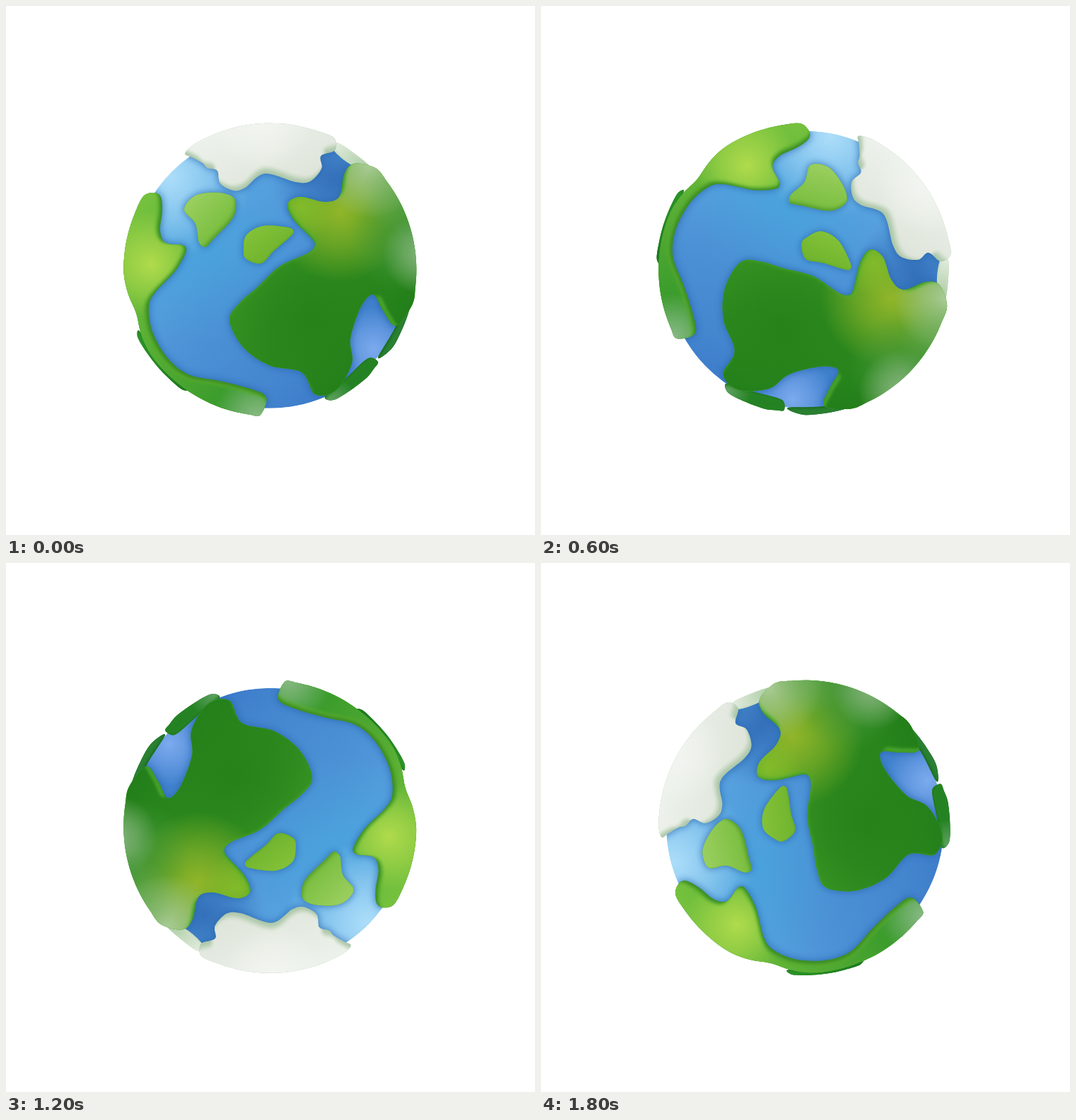
Recreate the animation shown at these times as an HTML page. Size 748 by 748 pixels, loop 2 s.

```html
<!DOCTYPE html>
<html lang="en">
<head>
<meta charset="utf-8">
<title>Spinning globe</title>
<style>
  html, body { margin: 0; width: 100%; height: 100%; overflow: hidden; background: #fff; }
  svg { display: block; width: 100vw; height: 100vh; }
</style>
</head>
<body>
<svg id="stage" viewBox="0 0 748 748"></svg>
<script>
const CX = 373.3, CY = 372.8, R = 196;
const STEP = 200;
const ANGLES = [0, 24, 41, 58, 88, 128, 182, 211.5, 272, 302];

// Blob: [x, y, radius, colour, opacity]
const ocean = [
  [285, 350, 130, '#43a5dc', .6],
  [232, 242, 115, '#b0e0fa', .95],
  [462, 245, 85, '#2f69b4', .85],
  [345, 480, 130, '#4a8cd0', .5],
  [520, 485, 60, '#7fadf0', .95]
];

// Coasts are key points; a rim [from, to, radius] closes the land along the horizon.
// lift is how far the top face stands off, as a share of the distance to the centre.
const lands = [
  { coast: '515,236 484,222 462,202', rim: [-62, -46, 203],
    wall: '#b9d3b4', lip: '#d5e2d1', face: ['#e3ece0', '#a9cba0'], lift: .01 },
  { coast: '262,540 212,490 188,459', rim: [153, 126, 210],
    wall: '#17701a', lip: '#2a8f26', face: ['#2c9427', '#1c7a1e'], lift: .01 },
  { coast: '526,497 551,453 572,398', rim: [9, 33, 205],
    wall: '#17661c', lip: '#1b7021', face: ['#1b7021', '#33883c'], lift: .01 },
  { coast: '451,552 480,527 512,498 526,503 520,513', rim: [48, 64, 205],
    wall: '#1d741d', lip: '#2a8826', face: ['#237f20', '#268426'], lift: .02,
    blobs: [[455, 560, 40, '#7fb383', .7]] },
  { coast: '209,264 219,270 221,290 218,318 226,335 250,338 255,346 240,374 211,405 202,425 207,460 228,497 258,521 302,530 345,541 368,553 360,578',
    rim: [98, 210, 207], dip: [162, 8],
    wall: '#3c8c24', lip: '#55aa2d', face: ['#78c33f', '#35982a'], lift: .04,
    blobs: [[205, 365, 75, '#b0db4c', 1], [355, 582, 62, '#a5c5a4', .75]] },
  { coast: '551,452 533,431 519,408 502,425 487,470 489,505 467,543 437,549 418,518 372,508 335,482 316,444 331,419 356,397 387,368 429,348 436,334 407,303 398,280 416,270 450,277 471,270 478,238 492,223',
    rim: [-44, 14, 207],
    wall: '#3a9124', lip: '#55b232', face: ['#43a028', '#1f7b18'], lift: .05,
    blobs: [[430, 445, 125, '#27821a', 1], [472, 290, 100, '#9cba2b', .9], [415, 285, 48, '#8fc52c', .7],
      [562, 330, 75, '#4c9b3e', .7], [590, 350, 58, '#9abe92', .8], [515, 222, 78, '#b8d2a8', .9], [555, 265, 55, '#72b062', .55]] },
  { coast: '252,288 268,268 300,264 322,271 325,288 318,304 293,330 282,341 273,334 268,308',
    wall: '#569f2e', lip: '#6eb339', face: ['#9fd163', '#6fb936'], lift: .06 },
  { coast: '336,346 340,324 364,311 402,314 406,322 378,347 361,364 340,358',
    wall: '#579f26', lip: '#6fb32e', face: ['#86c43a', '#6aaf2a'], lift: .08 },
  { coast: '465,204 445,212 446,230 430,248 410,249 366,237 338,257 322,261 303,251 299,233 285,229 278,222 263,214 253,209',
    rim: [238, 296, 207],
    wall: '#adc7aa', lip: '#c6d8c2', face: ['#eff5ef', '#dde3d8'], lift: .07,
    blobs: [[362, 162, 70, '#f3f5f1', .9]] }
];

const rad = a => a * Math.PI / 180;

function rimPoints([from, to, r], [mid, depth] = [0, 0]) {
  const n = Math.ceil(Math.abs(to - from) / 8);
  return Array.from({ length: n + 1 }, (_, i) => {
    const a = from + (to - from) * i / n;
    const d = r - depth * Math.exp(-(((a - mid) / 9) ** 2));
    return [CX + d * Math.cos(rad(a)), CY + d * Math.sin(rad(a))];
  });
}

// Closed smooth curve through the points
function curve(p) {
  const n = p.length, at = i => p[(i + n) % n];
  const span = (a, b) => Math.hypot(a[0] - b[0], a[1] - b[1]);
  // Handles never outgrow the segment they bend
  const handle = (b, before, after, len, sign) => {
    const k = sign * Math.min(1 / 6, .4 * len / (span(before, after) || 1));
    return [0, 1].map(j => (b[j] + (after[j] - before[j]) * k).toFixed(1));
  };
  let d = `M${p[0]}`;
  for (let i = 0; i < n; i++) {
    const [a, b, c, e] = [at(i - 1), at(i), at(i + 1), at(i + 2)];
    const len = span(b, c);
    d += `C${handle(b, a, c, len, 1)} ${handle(c, b, e, len, -1)} ${c}`;
  }
  return d + 'Z';
}

function outline({ coast, rim, dip }) {
  const p = coast.split(' ').map(s => s.split(',').map(Number));
  return curve(rim ? p.concat(rimPoints(rim, dip)) : p);
}

let defs = '', count = 0;

function blob([x, y, r, color, o]) {
  const id = 'b' + count++;
  defs += `<radialGradient id="${id}">
    <stop stop-color="${color}" stop-opacity="${o}"/>
    <stop offset=".5" stop-color="${color}" stop-opacity="${o * .55}"/>
    <stop offset="1" stop-color="${color}" stop-opacity="0"/></radialGradient>`;
  return `<circle cx="${x}" cy="${y}" r="${r}" fill="url(#${id})"/>`;
}

function ramp(id, [a, b]) {
  defs += `<linearGradient id="${id}" x1=".05" y1=".05" x2=".85" y2=".9">
    <stop stop-color="${a}"/><stop offset="1" stop-color="${b}"/></linearGradient>`;
}

function blur(id, s) {
  defs += `<filter id="${id}" x="-30%" y="-30%" width="160%" height="160%" color-interpolation-filters="sRGB">
    <feGaussianBlur stdDeviation="${s}"/></filter>`;
}

const raise = k => `translate(${CX} ${CY}) scale(${1 + k}) translate(${-CX} ${-CY})`;

function land(l, i) {
  ramp('f' + i, l.face);
  defs += `<clipPath id="c${i}"><path d="${l.d}"/></clipPath>
    <mask id="m${i}" maskUnits="userSpaceOnUse" x="0" y="0" width="748" height="748">
      <path d="${l.d}" fill="#fff" transform="${raise(l.lift)}" filter="url(#soft)"/></mask>`;
  return `<path d="${l.d}" fill="${l.wall}"/>
    <g clip-path="url(#c${i})">
      <path d="${l.d}" fill="${l.lip}" transform="${raise(l.lift / 2)}" filter="url(#soft)"/>
      <g mask="url(#m${i})">
        <path d="${l.d}" fill="url(#f${i})" stroke="url(#f${i})" stroke-width="2"/>
        ${(l.blobs || []).map(blob).join('')}
      </g>
    </g>`;
}

function build() {
  lands.forEach(l => l.d = outline(l));
  ramp('sea', ['#64b4e9', '#3a78c8']);
  blur('soft', 2);
  blur('cast', 5);
  const disc = `<circle cx="${CX}" cy="${CY}" r="${R}" fill="url(#sea)"/>`;
  defs += `<clipPath id="disc">${disc}</clipPath>`;
  const shade = lands.slice(4).map(l => `<path d="${l.d}"/>`).join('');
  const body = `<g clip-path="url(#disc)">
      ${disc}${ocean.map(blob).join('')}
      <g fill="#2461ad" stroke="#2461ad" stroke-width="3" opacity=".65" filter="url(#cast)">${shade}</g>
    </g>` + lands.map(land).join('');
  document.getElementById('stage').innerHTML = `<defs>${defs}</defs><g id="globe">${body}</g>`;
}

build();
const globe = document.getElementById('globe');
const start = performance.now();
let shown = -1;

function draw() {
  const step = Math.floor((performance.now() - start) / STEP) % ANGLES.length;
  if (step !== shown) {
    globe.setAttribute('transform', `rotate(${ANGLES[step]} ${CX} ${CY})`);
    shown = step;
  }
  requestAnimationFrame(draw);
}
draw();
</script>
</body>
</html>
```
